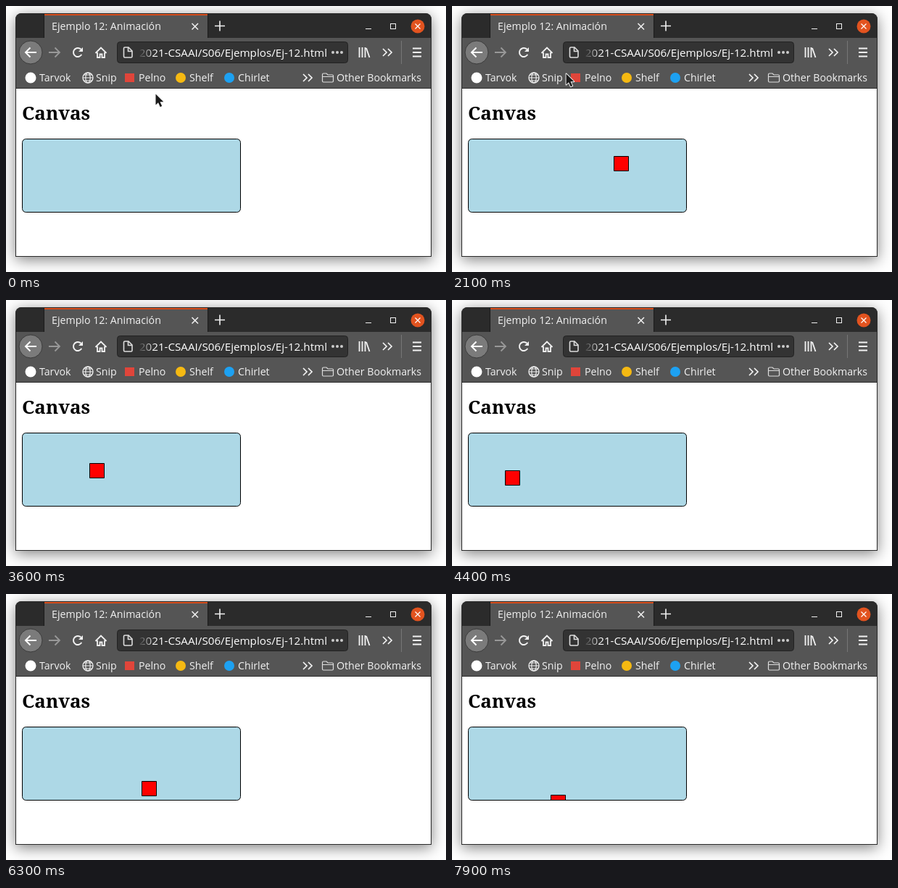
Animation, 607 px wide and 367 px high, one loop 8000 ms. Source, as an HTML page with a canvas:

```html
<!DOCTYPE html>
<html lang="es">
<head>
<meta charset="utf-8">
<title>Animación</title>
<style>
html, body { margin: 0; width: 100%; height: 100%; overflow: hidden; background: #fff; }
canvas { display: block; }
</style>
</head>
<body>
<canvas id="stage" width="607" height="367"></canvas>
<script>
const ctx = document.getElementById('stage').getContext('2d');
const LOOP = 8000, STEP = 100;
const UI = '"Open Sans", "Noto Sans", sans-serif';
const LIGHT = '#f2f2f2';

// [time, distance travelled by the square]
const TRAVEL = [[1000, 6], [1700, 131], [2100, 201], [3500, 451], [3600, 467], [4400, 611],
  [5200, 761], [5300, 777], [6100, 915], [6200, 925], [6300, 955], [7100, 1091], [7200, 1111], [7900, 1234]];
// [time, x, y] of the pointer tip
const POINTER = [[100, 206, 121], [600, 102, 62], [700, 100, 59], [1100, 100, 59], [1600, 157, 93],
  [2100, 157, 93], [2300, 162, 82], [2600, 168, 62], [3000, 120, 34], [3300, 72, 12]];

function along(keys, t, i = 1) {
  if (t <= keys[0][0]) return keys[0][i];
  const n = keys.findIndex(k => k[0] >= t);
  if (n < 0) return keys[keys.length - 1][i];
  const a = keys[n - 1], b = keys[n];
  return a[i] + (b[i] - a[i]) * (t - a[0]) / (b[0] - a[0]);
}

function rect(x, y, w, h, color) {
  ctx.fillStyle = color;
  ctx.fillRect(x, y, w, h);
}

function round(x, y, w, h, r, fill, stroke) {
  ctx.beginPath();
  ctx.roundRect(x, y, w, h, r);
  paint(fill, stroke);
}

function disc(x, y, r, fill, stroke, width) {
  ctx.beginPath();
  ctx.arc(x, y, r, 0, Math.PI * 2);
  paint(fill, stroke, width);
}

function paint(fill, stroke, width = 1) {
  if (fill) { ctx.fillStyle = fill; ctx.fill(); }
  if (stroke) { ctx.strokeStyle = stroke; ctx.lineWidth = width; ctx.stroke(); }
}

function path(d, stroke, width = 1.6, x = 0, y = 0, fill) {
  const p = new Path2D(d);
  ctx.save();
  ctx.translate(x, y);
  if (fill) { ctx.fillStyle = fill; ctx.fill(p); }
  if (stroke) { ctx.strokeStyle = stroke; ctx.lineWidth = width; ctx.stroke(p); }
  ctx.restore();
}

function text(str, x, y, size, color = LIGHT, family = UI, align = 'left') {
  ctx.font = size + 'px ' + family;
  ctx.textAlign = align;
  ctx.fillStyle = color;
  ctx.fillText(str, x, y);
}

function drawFrame() {
  rect(0, 0, 607, 367, '#fff');
  ctx.save();
  ctx.shadowColor = 'rgba(0,0,0,.5)';
  ctx.shadowBlur = 20;
  ctx.shadowOffsetY = 4;
  round(13, 10, 574, 336, [8, 8, 0, 0], '#2b2b2b');
  ctx.restore();
  rect(14, 44, 572, 69, '#555');
  rect(14, 113, 572, 1, '#2a2a2a');
  rect(14, 114, 572, 231, '#fff');
}

function drawTabs(t) {
  rect(52, 11, 1, 33, '#1c1c1c');
  rect(53, 11, 225, 33, '#555');
  rect(53, 11, 225, 2, '#d9501e');
  rect(278, 11, 1, 33, '#1c1c1c');
  text('Ejemplo 12: Animación', 63, 33, 14.2);
  drawBurst(t);
  path('M256.5 24l8.5 8.5m0-8.5l-8.5 8.5', LIGHT, 1.5);
  path('M288 27.5h14m-7-7v14', LIGHT, 1.6);
  rect(496, 31, 8, 1, LIGHT);
  ctx.strokeStyle = LIGHT;
  ctx.lineWidth = 1;
  ctx.strokeRect(530.5, 24.5, 7, 7);
  disc(568, 28, 9.5, '#e2531f');
  path('M564.5 24.5l7 7m0-7l-7 7', '#fff', 1.2);
}

function drawBurst(t) {
  const n = (t - 1000) / STEP;
  if (n < 0 || n > 2) return;
  ctx.save();
  ctx.beginPath();
  ctx.rect(53, 13, 225, 31);
  ctx.clip();
  ctx.globalAlpha = 0.6 / (1 + 3 * n);
  disc(71, 28, 5 + 80 * n, '#3b8fe8');
  ctx.restore();
}

function drawNav(overReload, overUrl) {
  disc(34, 64, 16, '#7b7b7b', '#3c3c3c');
  const arrow = 'M8 0H-7M-.5-6.5L-7 0L-.5 6.5';
  path(arrow, '#fff', 2, 34, 64);
  ctx.save();
  ctx.scale(-1, 1);
  path(arrow, '#989898', 1.8, -67, 64);
  ctx.restore();

  if (overReload) round(85, 50, 28, 28, 3, '#7b7b7b');
  ctx.beginPath();
  ctx.arc(99, 64, 6, 0.5, 5.5);
  paint(null, LIGHT, 2);
  path('M106 57v6h-6z', null, 1, 0, 0, LIGHT);

  path('M123.5 65l7.5-7.5 7.5 7.5M126 64v7h3.5v-4.5h3v4.5h3.500v-7', LIGHT, 1.8);

  round(153.5, 49.5, 318, 29, 4, '#333', overUrl ? '#777' : '#222');
  path('M162.500 58.500q0-1.500 1.500-1.500h5l5 5v7.500q0 1.500-1.500 1.500h-8.500q-1.500 0-1.500-1.500zM168.500 57.500v5h5', '#ddd', 1.6);
  text('2021-CSAAI/S06/Ejemplos/Ej-12.html', 443, 70, 15.2, '#fff', UI, 'right');
  const fade = ctx.createLinearGradient(182, 0, 206, 0);
  fade.addColorStop(0, 'rgba(51,51,51,1)');
  fade.addColorStop(1, 'rgba(51,51,51,0)');
  rect(180, 52, 26, 24, fade);
  for (const x of [451, 457, 463]) disc(x, 64, 2, '#ccc');

  path('M487.500 57v14m4-14v14m4-14v14m1.500-13l4.500 13', LIGHT, 1.8);
  chevrons(526, 64);
  rect(545, 48, 1, 32, '#777');
  path('M561 58.500h12m-12 5.500h12m-12 5.500h12', LIGHT, 1.8);
}

function chevrons(x, y) {
  path('M-6-5L-1 0L-6 5M1-5L6 0L1 5', LIGHT, 1.7, x, y);
}

function drawBookmarks() {
  const label = (str, x) => text(str, x, 104, 14.2);
  disc(34, 99, 7.5, '#fff');
  label('Tarvok', 46);
  disc(113, 99, 7, null, LIGHT, 1.3);
  path('M106 99h14M107.500 95h11m-11 8h11', LIGHT, 1.1);
  ctx.beginPath();
  ctx.ellipse(113, 99, 3.2, 7, 0, 0, Math.PI * 2);
  paint(null, LIGHT, 1.1);
  label('Snip', 124);
  rect(164, 93, 13, 12, '#e0453a');
  label('Pelno', 183);
  disc(241, 99, 7, '#f5b912');
  label('Shelf', 253);
  disc(308, 99, 7, '#1da1f2');
  label('Chirlet', 320);
  chevrons(416, 99);
  path('M436.500 94.500q0-1.500 1.500-1.500h4l2 2h6q1.500 0 1.500 1.500v7q0 1.500-1.500 1.500h-12q-1.500 0-1.500-1.500zM437 97.500h14', '#ddd', 1.2);
  label('Other Bookmarks', 456);
}

function drawPage(t) {
  text('Canvas', 22, 157, 26, '#000', '"Noto Serif", serif').length;
}

function drawHeading() {
  ctx.font = 'bold 26px "Noto Serif", "Liberation Serif", serif';
  ctx.textAlign = 'left';
  ctx.fillStyle = '#000';
  ctx.fillText('Canvas', 22, 157);
}

function drawBox(t) {
  round(22.5, 183.5, 301, 101, 5, '#add8e6');
  if (t >= 1000) {
    const d = along(TRAVEL, t);
    const x = 280 - Math.abs(280 - d % 560);
    const y = 10 + (d - 6) * 0.0674;
    ctx.save();
    ctx.clip();
    ctx.beginPath();
    ctx.rect(Math.round(x) + 22.5, Math.round(y) + 184.5, 20, 20);
    paint('#f00', '#000');
    ctx.restore();
  }
  round(22.5, 183.5, 301, 101, 5, null, '#000');
}

function drawPointer(x, y) {
  ctx.lineJoin = 'round';
  path('M.5.5V15.500l3.500-3.300 2.700 6 2.500-1.100-2.700-5.800h4.800z', '#fff', 1.8, x, y, '#1a1a1a');
  path('M.5.5V15.500l3.500-3.300 2.700 6 2.500-1.100-2.700-5.800h4.800z', null, 1, x, y, '#1a1a1a');
  ctx.lineJoin = 'miter';
}

function render(t) {
  const px = Math.round(along(POINTER, t, 1)), py = Math.round(along(POINTER, t, 2));
  const shown = t <= 3300;
  const over = (x, y, w, h) => shown && px >= x && px < x + w && py >= y && py < y + h;
  drawFrame();
  drawTabs(t);
  drawNav(over(85, 50, 28, 28), over(153, 49, 319, 30));
  drawBookmarks();
  drawHeading();
  drawBox(t);
  ctx.beginPath();
  ctx.roundRect(13.5, 10.5, 573, 335, [8, 8, 0, 0]);
  paint(null, '#2a2a2a');
  if (shown) drawPointer(px, py);
}

const start = performance.now();
function tick() {
  const t = (performance.now() - start) % LOOP;
  render(Math.floor(t / STEP) * STEP);
  requestAnimationFrame(tick);
}
tick();
</script>
</body>
</html>
```
